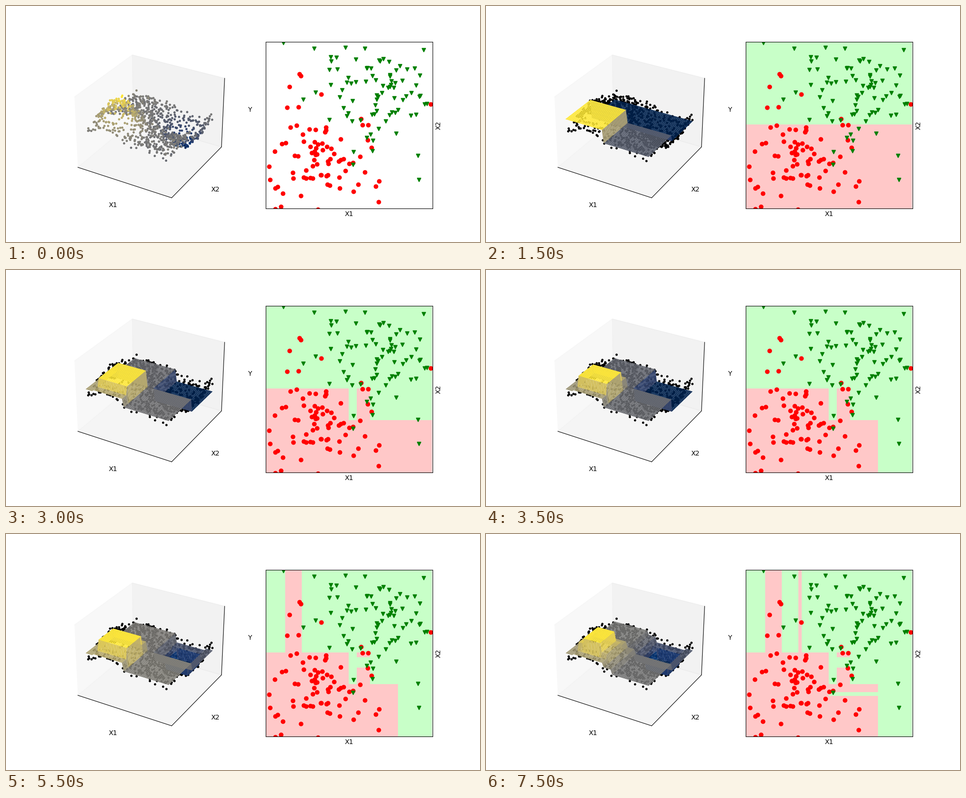
Recreate the animation shown at these times as a matplotlib script. Size 1000x500 px, loop 8000 ms.

```python
import numpy as np
import matplotlib.pyplot as plt
from matplotlib.animation import FuncAnimation

STEP_MS = 500
FRAMES = 16
rng = np.random.default_rng(7)

# Points that shape the class regions; the rest are drawn at random.
RED_KEYS = [
    (619, 144), (622, 148), (598, 171), (665, 187), (593, 215), (617, 214),
    (896, 208), (749, 239), (752, 252), (764, 252), (763, 282.9), (771, 300),
    (747, 319), (732, 332), (724, 334), (757, 352), (787, 371), (743, 378),
    (780, 382), (733, 393), (786, 415),
]
GREEN_KEYS = [
    (585, 78), (650, 90), (653, 183), (627, 198), (786, 260), (823, 270),
    (769, 272), (761, 279), (774, 285), (773, 307), (733, 309), (869, 317),
    (732, 336), (871, 368),
]
RED_KEYS[10] = (763, 284)

# Leaf, axis and threshold; the lower part keeps its index.
CLASS_SPLITS = [
    (0, "y", 251), (1, "x", 723), (2, "y", 318), (2, "x", 768),
    (2, "x", 740), (3, "x", 827), (5, "y", 261), (7, "y", 283),
    (0, "x", 624), (0, "x", 589), (3, "y", 343), (3, "y", 335),
    (9, "x", 666), (9, "x", 659),
]


def bump(x, y, c):
    return np.exp(-5.5 * ((x - c) ** 2 + (y - c) ** 2))


def hills(x, y):
    return 0.35 * bump(x, y, -0.5) - 0.33 * bump(x, y, 0.5) - 0.01


def cloud(keys, center, spread, n, x_range, y_range):
    """Key points plus a normal cloud cut to a box."""
    x, y = rng.normal(center, spread, (n, 2)).T
    keep = (x > x_range[0]) & (x < x_range[1])
    keep &= (y > y_range[0]) & (y < y_range[1])
    return np.vstack([keys, np.column_stack([x, y])[keep]])


def best_split(z, leaf):
    """Return (gain, leaf, axis, index) of the cut that removes most variance."""
    block = z[leaf]
    best = (0, leaf, 0, 0)
    for axis, n in enumerate(block.shape):
        if n < 2:
            continue
        sums = np.cumsum(block.mean(axis=1 - axis))
        k = np.arange(1, n)
        step = sums[:-1] / k - (sums[-1] - sums[:-1]) / (n - k)
        gain = block.size * k * (n - k) / n**2 * step**2
        i = gain.argmax()
        if gain[i] > 1.0001 * best[0]:
            best = (gain[i], leaf, axis, leaf[axis].start + k[i])
    return best


def fit_surfaces(z, count):
    """Grow a regression tree best-first, one surface per split."""
    leaves = [(slice(0, z.shape[0]), slice(0, z.shape[1]))]
    surfaces = []
    for _ in range(count):
        _, leaf, axis, cut = max((best_split(z, s) for s in leaves),
                                 key=lambda split: split[0])
        leaves.remove(leaf)
        for part in (slice(leaf[axis].start, cut), slice(cut, leaf[axis].stop)):
            leaves.append((part, leaf[1]) if axis == 0 else (leaf[0], part))
        fit = np.empty_like(z)
        for s in leaves:
            fit[s] = z[s].mean()
        surfaces.append(fit)
    return surfaces


def class_regions(n):
    """Return leaves as [x0, x1, y0, y1] after n splits."""
    leaves = [[547, 899, 77.5, 430]]
    for i, axis, cut in CLASS_SPLITS[:n]:
        low, high = leaves[i][:], leaves[i][:]
        side = 2 * "xy".index(axis)
        low[side + 1] = high[side] = cut
        leaves[i] = low
        leaves.append(high)
    return leaves


fig = plt.figure(figsize=(10, 5), dpi=100)

# Regression in 3D
ax3 = fig.add_subplot(121, projection="3d", computed_zorder=False)
px, py = rng.uniform(-1, 1, (2, 1000))
pz = hills(px, py) + rng.normal(0, 0.026, px.size)
dots = dict(s=12, lw=0, depthshade=False, zorder=1)
colored = ax3.scatter(px, py, pz, c=pz, cmap="cividis", **dots)
black = ax3.scatter(px, py, pz, c="black", **dots)
half = 1.1 * 25 / 24
ax3.set(xlim=(-half, half), ylim=(-half, half), zlim=(-0.4464, 0.4464),
        xticks=[], yticks=[], zticks=[],
        xlabel="X1", ylabel="X2", zlabel="Y")
grid = np.linspace(-1, 0.985, 50)
GX, GY = np.meshgrid(grid, grid)
surfaces = fit_surfaces(hills(GX, GY), len(CLASS_SPLITS))

# Classification in 2D, in stage pixels
ax2 = fig.add_subplot(122)
red = cloud(RED_KEYS, (648, 325), (58, 55), 85, (548, 720), (252, 432))
green = cloud(GREEN_KEYS, (778, 172), (66, 58), 85, (668, 900), (76, 248))
ax2.plot(*red.T, "ro")
ax2.plot(*green.T, "gv")
ax2.set(xlim=(547.73, 900), ylim=(428.64, 76.36), xticks=[], yticks=[],
        xlabel="X1", ylabel="X2")
ax2.set_aspect("equal")
ax2.yaxis.set_label_position("right")

drawn = []


def count_in(points, x0, x1, y0, y1):
    x, y = points.T
    return np.sum((x >= x0) & (x < x1) & (y >= y0) & (y < y1))


def clear():
    while drawn:
        drawn.pop().remove()


def draw(frame):
    clear()
    n = max(0, frame - 1)
    colored.set_visible(n == 0)
    black.set_visible(n > 0)
    if n == 0:
        return

    drawn.append(ax3.plot_surface(GX, GY, surfaces[n - 1], cmap="cividis",
                                  linewidth=0, zorder=2))
    for x0, x1, y0, y1 in class_regions(n):
        box = (x0, x1, y0, y1)
        is_green = count_in(green, *box) >= count_in(red, *box)
        rect = plt.Rectangle((x0, y0), x1 - x0, y1 - y0, lw=0, zorder=0,
                             fc="#c8ffc8" if is_green else "#ffc8c8",
                             antialiased=False)
        drawn.append(ax2.add_patch(rect))


anim = FuncAnimation(fig, draw, frames=FRAMES, init_func=clear,
                     interval=STEP_MS, repeat=True, repeat_delay=0)
plt.show()
```
